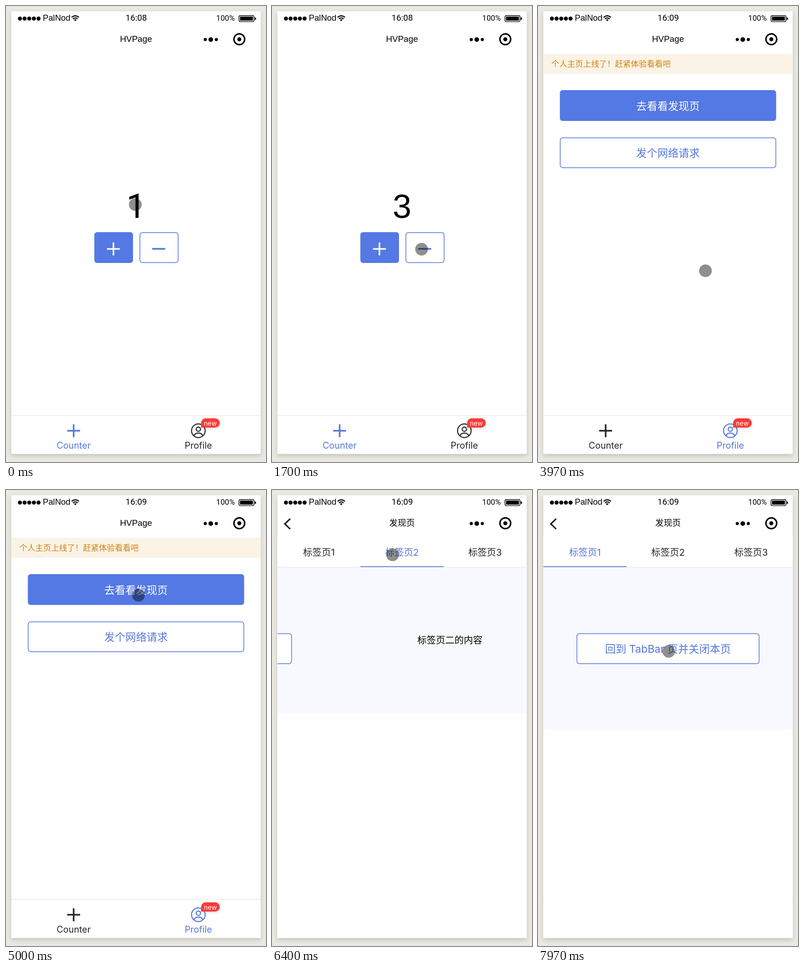
Recreate the animation shown at these times as an HTML page. Size 565x992 px, loop 8000 ms.

```html
<!DOCTYPE html>
<html lang="zh">
<head>
<meta charset="utf-8">
<style>
  html, body { margin: 0; height: 100%; overflow: hidden; background: #e9e9e2; }
  svg { display: block; width: 100%; height: 100%; }
  text { font-family: Inter, "Noto Sans CJK SC", "Noto Sans CJK", sans-serif; text-anchor: middle; }
  .bar { font-family: "Liberation Sans", sans-serif; }
  .num { font-family: Roboto, sans-serif; }
  .start { text-anchor: start; }
  .line { fill: none; stroke: currentColor; }
  .solid { fill: #5478e4; }
  .outline { fill: #fff; stroke: #4d74dc; stroke-width: 1.5; }
  .blue { fill: #5478dc; }
  .phone { filter: drop-shadow(0 4px 5px rgba(0,0,0,.16)); }
  #tabs text { font-size: 20.2px; }
</style>
</head>
<body>
<svg viewBox="0 0 565 992">
  <defs>
    <clipPath id="screen"><rect x="11.5" y="11.5" width="542" height="963"/></clipPath>
    <clipPath id="panelClip"><rect x="11.5" y="168" width="542" height="360"/></clipPath>
  </defs>
  <rect class="phone" x="11.5" y="11.5" width="542" height="963" fill="#fff"/>

  <g clip-path="url(#screen)">
    <g id="counter">
      <text id="count" x="282.5" y="461"></text>
      <rect class="solid" x="192" y="492" width="84" height="67" rx="6"/>
      <path d="M219.5 528.5h28M233.5 514.5v28" stroke="#fff" stroke-width="3.5"/>
      <rect class="outline" x="291" y="493" width="83" height="65.3" rx="5.5"/>
      <path d="M317.5 528.3h28.5" stroke="#5478dc" stroke-width="3.6"/>
    </g>

    <g id="profile">
      <rect x="11" y="104" width="543" height="43.3" fill="#fbf3e6"/>
      <text class="start" x="29" y="131.7" font-size="17.3" fill="#d08310">个人主页上线了！赶紧体验看看吧</text>
      <rect class="solid" x="47.5" y="183" width="470" height="67" rx="6"/>
      <text x="282.5" y="225.5" font-size="23" fill="#fff">去看看发现页</text>
      <rect class="outline" x="48.3" y="286.7" width="468.5" height="65" rx="5.5"/>
      <text class="blue" x="282.5" y="328.3" font-size="23">发个网络请求</text>
    </g>

    <path d="M11 890.5h543" stroke="#dce4e6"/>
    <g id="tabCounter">
      <path class="line" d="M133 924h28M147 910v28" stroke-width="3.5"/>
      <text x="147" y="963" font-size="19.6" fill="currentColor">Counter</text>
    </g>
    <g id="tabProfile">
      <g class="line" stroke-width="2.3">
        <circle cx="418" cy="924" r="14.8"/>
        <circle cx="418" cy="920.7" r="4.7"/>
        <path d="M408.5 935c3-8 16-8 19 0"/>
      </g>
      <text x="418" y="963" font-size="19.6" fill="currentColor">Profile</text>
    </g>
    <path d="M424 917v-10a10 10 0 0 1 10-10h20.5a10 10 0 0 1 0 20z" fill="#fb3b37"
      style="filter:drop-shadow(0 2px 2px rgba(0,0,0,.18))"/>
    <text x="444" y="913" font-size="14.2" fill="#fff">new</text>

    <g id="discover">
      <rect x="11.5" y="104" width="542" height="871" fill="#fff"/>
      <rect id="panel" x="11.5" y="168" width="542" fill="#f8f9fe"/>
      <g clip-path="url(#panelClip)">
        <g id="swipe">
          <rect class="outline" x="84.5" y="312.5" width="396" height="65.3" rx="5.5"/>
          <text class="blue" x="282.5" y="354" font-size="23">回到 TabBar 页并关闭本页</text>
          <text x="824.5" y="333.7" font-size="20.2">标签页二的内容</text>
        </g>
      </g>
      <path d="M11.5 168h542" stroke="#e4e6ec"/>
      <path id="underline" d="M11.5 166.7h181" stroke="#5478dc" stroke-width="1.8"/>
      <g id="tabs">
        <text x="102" y="142.7">标签页1</text>
        <text x="282.5" y="142.7">标签页2</text>
        <text x="463" y="142.7">标签页3</text>
      </g>
    </g>
  </g>

  <g id="signal"></g>
  <text class="bar start" x="80" y="32.4" font-size="18.3">PalNod</text>
  <g fill="none" stroke="#000" stroke-width="2.3">
    <path d="M142.5 24.5q8-6.5 16 0M145.4 28q5.1-4.2 10.2 0"/>
  </g>
  <path d="M150.5 33l-3-3q3-2.2 6 0z"/>
  <text id="clock" class="num" x="283" y="32.2" font-size="18.6"></text>
  <text class="num" x="477" y="32.3" font-size="16.7">100%</text>
  <rect x="506.3" y="20.7" width="32.6" height="13.4" rx="3" fill="none" stroke="#000" stroke-width="1.4"/>
  <rect x="508.5" y="23" width="28" height="8.8" rx="1"/>
  <path d="M540.5 24.5q3 .5 3 3t-3 3z"/>
  <text id="title" x="282.5"></text>
  <path id="back" d="M39.5 62.5L28 73.7l11.500 11.300" fill="none" stroke="#000" stroke-width="3"/>
  <circle cx="433" cy="73" r="3.4"/><circle cx="445" cy="73" r="5"/><circle cx="457" cy="73" r="3.4"/>
  <circle cx="507" cy="72.3" r="11.7" fill="none" stroke="#000" stroke-width="3.2"/>
  <circle cx="507" cy="72.3" r="4.4"/>

  <g id="cursor">
    <g id="ring" fill="none">
      <circle r="32" stroke="#fff" stroke-width="4"/>
      <circle r="31.200" stroke="#000" stroke-width="2"/>
    </g>
    <circle r="13.800" fill="#000" fill-opacity=".44"/>
  </g>
</svg>
<script>
const $ = id => document.getElementById(id);
const LOOP = 8000, WIDTH = 542, PRESS = 150, REACT = 40;
const BLUE = '#5478dc', DARK = '#262626';

// pointer stops: time, x, y
const path = [
  [30, 281, 432], [520, 237, 528], [1150, 235, 529], [1520, 325, 529],
  [2930, 325, 529], [3280, 493, 935], [3370, 461, 952], [3430, 434, 951],
  [3570, 434, 951], [3635, 446, 951], [4290, 288, 229], [5640, 288, 229],
  [6020, 262, 141], [6850, 262, 141], [7170, 105, 139], [7340, 105, 139],
  [7700, 275, 332], [7960, 284, 351]
];
const plus = [700, 1000], minus = [1830, 2280, 2780];
const openProfile = 3570, openDiscover = 5130, toTab2 = 6220, toTab1 = 7240;
const clicks = [...plus, ...minus, openProfile, openDiscover, toTab2, toTab1];

const clamp = v => Math.max(0, Math.min(1, v));
const smooth = u => u * u * (3 - 2 * u);
const slide = (t, start) => 1 - (1 - clamp((t - start) / 300)) ** 2.6;
const show = (id, on) => $(id).style.display = on ? '' : 'none';
const move = (id, x, y = 0) => $(id).setAttribute('transform', `translate(${x} ${y})`);
const set = (id, attrs) => { for (const k in attrs) $(id).setAttribute(k, attrs[k]); };

function pointer(t) {
  const i = path.findIndex(p => p[0] > t);
  if (i === 0) return path[0].slice(1);
  if (i < 0) return path.at(-1).slice(1);
  const [a, x, y] = path[i - 1], [b, x2, y2] = path[i];
  const s = smooth((t - a) / (b - a));
  return [x + (x2 - x) * s, y + (y2 - y) * s];
}

function draw(t) {
  const done = list => list.filter(c => t >= c + REACT).length;
  const profile = t >= openProfile + REACT;
  const pageStart = 5397, discover = t >= pageStart - 20;
  const tab2 = t >= toTab2 + REACT && t < toTab1 + REACT;

  const n = 1 + done(plus) - done(minus);
  $('count').textContent = n;
  set('count', { class: n === 1 ? 'num' : 'bar', 'font-size': n === 1 ? 74 : 73 });
  $('clock').textContent = profile ? '16:09' : '16:08';
  $('title').textContent = discover ? '发现页' : 'HVPage';
  set('title', discover
    ? { class: '', 'font-size': 18.5, y: 78 }
    : { class: 'bar', 'font-size': 18.7, y: 78 });

  show('counter', !profile);
  show('profile', profile);
  show('back', discover);
  show('discover', discover);
  $('tabCounter').style.color = profile ? DARK : BLUE;
  $('tabProfile').style.color = profile ? BLUE : DARK;

  move('discover', WIDTH * (1 - slide(t, pageStart)));
  move('swipe', -WIDTH * (slide(t, toTab2 + REACT) - slide(t, toTab1 + REACT)));
  move('underline', tab2 ? 180.7 : 0);
  set('panel', { height: tab2 ? 317.5 : 354 });
  [...$('tabs').children].forEach((el, i) =>
    el.setAttribute('fill', i === +tab2 ? BLUE : DARK));

  move('cursor', ...pointer(t));
  show('ring', clicks.some(c => t >= c && t < c + PRESS));
}

$('signal').innerHTML = [0, 1, 2, 3, 4]
  .map(i => `<circle cx="${30.3 + i * 10.1}" cy="27.3" r="4.4"/>`).join('');

const begin = performance.now();
function tick() {
  draw((performance.now() - begin) % LOOP);
  requestAnimationFrame(tick);
}
tick();
</script>
</body>
</html>
```
